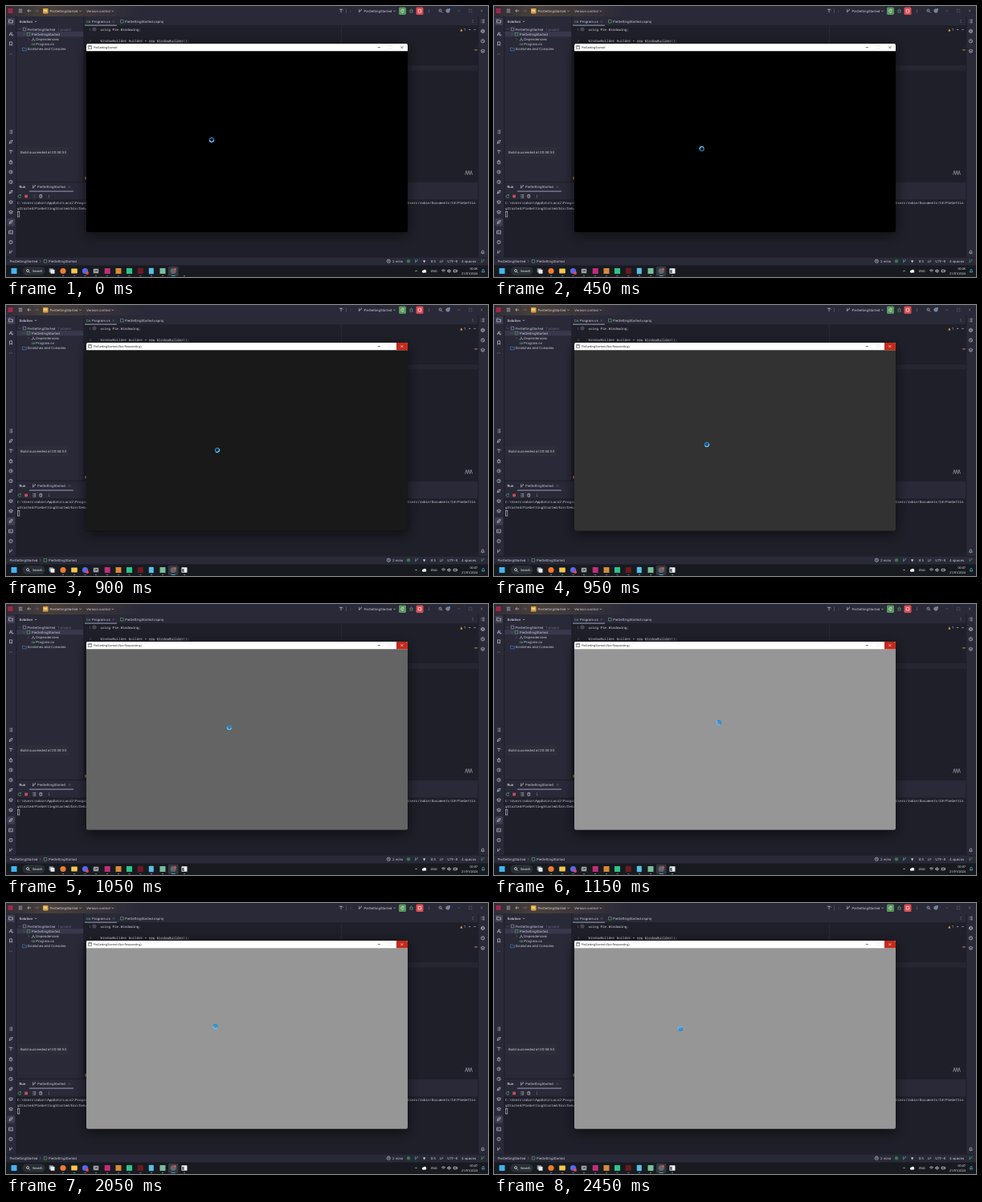
These frames come from a looping animation (600 by 338 pixels, 2.5 s). An HTML page with a canvas:

```html
<!DOCTYPE html>
<html lang="en">
<head>
<meta charset="utf-8">
<title>PieGettingStarted</title>
<style>
  html, body { margin: 0; width: 100%; height: 100%; overflow: hidden; background: #292938; }
  canvas { display: block; width: 600px; height: 338px; }
</style>
</head>
<body>
<canvas id="stage" width="600" height="338"></canvas>
<script>
const g = document.getElementById('stage').getContext('2d');
const LOOP = 2500, STEP = 50;
const UI = 'Inter, sans-serif', MONO = '"Noto Sans Mono", monospace', SYS = '"Open Sans", sans-serif';
const FG = '#cfd1dd', DIM = '#6d6f7e', PANEL = '#292938', EDITOR = '#1f1f29', LINE = '#1b1b25', TAB = '#84869c';
const GREEN = '#5aa865', RED = '#c94f55', BLUE = '#4b9fe8', AMBER = '#d9a441';

function rect(x, y, w, h, color, r = 0) {
  g.fillStyle = color;
  g.beginPath();
  g.roundRect(x, y, w, h, r);
  g.fill();
}

function disc(x, y, r, color) {
  g.fillStyle = color;
  g.beginPath();
  g.arc(x, y, r, 0, 7);
  g.fill();
}

function text(s, x, y, color = FG, { size = 4.2, font = UI, weight = 400, align = 'left' } = {}) {
  g.font = `${weight} ${size}px ${font}`;
  g.textRendering = 'geometricPrecision';
  g.textAlign = align;
  g.textBaseline = 'alphabetic';
  g.fillStyle = color;
  g.fillText(s, x, y + size * 0.36);
}

// Line icons, drawn around their centre
const ICONS = {
  menu: 'M-2.3-1.8h4.6M-2.3 0h4.6M-2.3 1.8h4.6',
  back: 'M2.2 0h-4.4l1.8-1.8m-1.8 1.8l1.8 1.8',
  next: 'M-2.2 0h4.4l-1.8-1.8m1.8 1.8l-1.8 1.8',
  down: 'M-1.2-.6l1.2 1.2l1.2-1.2',
  up: 'M-1.2.6l1.2-1.2l1.2 1.2',
  right: 'M-.6-1.2l1.2 1.2l-1.2 1.2',
  folder: 'M-2.4-1.8h1.8l.8.8h2.2v3h-4.8z',
  box: 'M-1.8-1.8h3.6v3.6h-3.6z',
  bookmark: 'M-1.5-2.2h3v4.4l-1.5-1.2l-1.5 1.2z',
  people: 'M-1.6 2.2v-2h2.6v2M.3-2a1 1 0 1 0 .1 0M1.6 2h1v-1.4',
  list: 'M-2-1.8h.6M-.6-1.8h2.8M-2 0h.6M-.6 0h2.8M-2 1.8h.6M-.6 1.8h2.8',
  hammer: 'M-2.2-1.8h3.8l.8 1.2M0-1.8v4',
  rocket: 'M-2 2l1-3l3-1l-1 3l-3 1M-1 0l1 1',
  bug: 'M-1.2-1h2.4v2.4a1.2 1.2 0 0 1-2.4 0zM-2.3-.4l1 .4M2.3-.4l-1 .4M-2.3 2l1-.6M2.3 2l-1-.6M-.8-2h1.6',
  clock: 'M2.1 0a2.1 2.1 0 1 1-4.2 0a2.1 2.1 0 1 1 4.2 0M0-1.2v1.3l1 .6',
  layers: 'M0-2l2.4 1.3L0 .6l-2.4-1.3zM-2.4.8L0 2.1L2.4.8',
  term: 'M-2.4-1.8h4.8v3.8h-4.8zM-1.4-.7l.9.8l-.9.8M.2 1h1',
  alert: 'M2.1 0a2.1 2.1 0 1 1-4.2 0a2.1 2.1 0 1 1 4.2 0M0-1.1v1.2M0 .8v.4',
  branch: 'M-1.3-2v4M-1.3 1.2c0-1.4 2.6-.4 2.6-2.6M.7-1.8h1.2',
  search: 'M1-.4a1.5 1.5 0 1 1-3 0a1.5 1.5 0 1 1 3 0M.6.8l1.5 1.5',
  gear: 'M1.1 0a1.1 1.1 0 1 1-2.2 0a1.1 1.1 0 1 1 2.2 0M0-2.2L2-1.1V1.1L0 2.2L-2 1.1V-1.1z',
  bell: 'M-1.9 1.2h3.8l-.7-1v-1a1.2 1.2 0 0 0-2.4 0v1zM-.4 2h.8',
  close: 'M-1.3-1.3l2.6 2.6m0-2.6l-2.6 2.6',
  min: 'M-1.5 0h3',
  dots: 'M-1.9 0h.6M-.3 0h.6M1.3 0h.6',
  vdots: 'M0-1.6v.6M0-.3v.6M0 1v.6',
  reload: 'M1.4-1a1.8 1.8 0 1 0 .3 1.6M1.5-2v1.2h-1.2',
  trash: 'M-1.8-1.4h3.6M-1.3-1.4v3.2h2.6v-3.2M-.5-2h1',
  wave: 'M-4.5 2.5l1.5-5l1.5 5l1.5-5l1.5 5l1.5-5l1.5 5',
  tree: 'M0-1.8v1.6M-1.7 1.6L0-.2L1.7 1.6M-2.1 1.6h.9M1.2 1.6h.9',
  wifi: 'M-2.3-.6a3.2 3.2 0 0 1 4.6 0M-1.3.5a1.9 1.9 0 0 1 2.6 0M0 1.4v.2',
  sound: 'M-2-.7h1l1.3-1.2v3.8L-1 .7h-1zM1.3-1a1.6 1.6 0 0 1 0 2',
  battery: 'M-2.3-1.2h4v2.4h-4zM2.2-.4v.8'
};

function icon(name, x, y, color = FG, width = 0.65) {
  g.save();
  g.translate(x, y);
  g.strokeStyle = color;
  g.lineWidth = width;
  g.stroke(new Path2D(ICONS[name]));
  g.restore();
}

function topBar() {
  rect(0, 0, 600, 13, PANEL);
  const glow = g.createLinearGradient(0, 0, 170, 0);
  glow.addColorStop(0, '#d9a44108');
  glow.addColorStop(0.3, '#d9a44130');
  glow.addColorStop(1, '#d9a44100');
  rect(0, 0, 170, 13, glow);
  rect(2.5, 3, 6, 6, '#a52745');
  icon('menu', 18, 6);
  icon('back', 29, 6);
  icon('next', 38, 6, DIM);
  rect(46, 3, 6.5, 6.5, AMBER, 1);
  text('PG', 49.2, 6.2, '#fff', { size: 3, weight: 700, align: 'center' });
  text('PieGettingStarted', 54.5, 6.3);
  icon('down', 92.5, 6.3);
  text('Version control', 100, 6.3);
  icon('down', 132.8, 6.3);
  icon('hammer', 417, 6);
  rect(423.2, 3.5, 0.5, 5.5, DIM);
  icon('vdots', 429, 6.3, DIM);
  icon('branch', 441, 6);
  text('PieGettingStarted', 445.5, 6.3);
  icon('down', 483.5, 6.3);
  rect(489, 1.5, 9, 9.5, '#57965c', 1.5);
  icon('reload', 493.5, 6.2, '#fff');
  icon('bug', 504.5, 6, GREEN);
  rect(510.5, 1.5, 9, 9.5, '#d94c52', 1.5);
  icon('box', 515, 6.2, '#fff');
  icon('vdots', 526.5, 6.2);
  icon('search', 541, 6);
  icon('gear', 550, 6);
  disc(552, 4, 1, BLUE);
  icon('min', 564, 6, DIM);
  icon('box', 578, 6, DIM, 0.4);
  icon('close', 592, 6, DIM);
}

function sideStrips() {
  rect(1.5, 14.5, 9.5, 9.5, '#3d3e50', 1.5);
  rect(1.5, 265, 9.5, 9.5, '#3d3e50', 1.5);
  [['folder', 19], ['people', 35], ['bookmark', 47], ['dots', 60]]
    .forEach(([name, y]) => icon(name, 6, y));
  ['list', 'rocket', 'hammer', 'bug', 'clock', 'clock', 'rocket', 'layers', 'layers', 'rocket', 'term', 'alert', 'branch']
    .forEach((name, i) => icon(name, 6, 157 + i * 12.5));
  ['list', 'gear', 'clock', 'layers'].forEach((name, i) => icon(name, 593.5, 19 + i * 12.4));
  icon('bell', 593.5, 307);
  rect(12.5, 13, 0.7, 300, LINE);
  rect(587.5, 13, 0.7, 300, LINE);
}

function solution() {
  text('Solution', 16.5, 19.3, FG, { weight: 600 });
  icon('down', 37, 19.3);
  rect(13.2, 32, 83.3, 6.3, '#38384c');
  icon('down', 17, 29, DIM);
  icon('box', 23, 29, '#9aa0c0');
  text('PieGettingStarted', 26.5, 29.2);
  text('1 project', 64.5, 29.2, DIM);
  icon('down', 22.5, 35.2, DIM);
  icon('box', 28, 35.2, GREEN);
  text('PieGettingStarted', 32, 35.3);
  icon('right', 28, 41.5, DIM);
  icon('tree', 34, 41.5);
  text('Dependencies', 37.3, 41.6);
  text('C#', 31.5, 47.8, GREEN, { size: 3.5, weight: 700 });
  text('Program.cs', 37.3, 47.8);
  icon('folder', 23, 53.8, BLUE, 0.5);
  text('Scratches and Consoles', 26.5, 53.9);
  rect(13.5, 176, 65, 12.8, '#2d2d39', 1.5);
  text('Build succeeded at 00:06:53', 18, 182.4);
}

function editor() {
  rect(97, 13, 490.5, 206, EDITOR);
  rect(97, 13, 490.5, 11.8, PANEL);
  rect(97, 24.6, 490.5, 0.5, LINE);
  rect(96.5, 13, 0.7, 206, LINE);
  rect(98, 23.5, 40, 1.2, TAB);
  text('C#', 100, 19.3, GREEN, { size: 3.7, weight: 700 });
  text('Program.cs', 107, 19.3);
  icon('close', 133.8, 19.3, DIM, 0.5);
  icon('box', 144.3, 19.2, GREEN);
  text('PieGettingStarted.csproj', 148, 19.3);
  icon('vdots', 581, 19);

  const code = { font: MONO };
  text('1', 103.5, 29.5, DIM, code);
  text('3', 103.5, 43.3, DIM, code);
  icon('gear', 110, 29, DIM);
  text('using Pie.Windowing;', 117.5, 29.5, FG, code);
  text('WindowBuilder builder = new WindowBuilder();', 117.5, 43.3, FG, code);
  rect(178, 45.2, 7.5, 0.4, DIM);
  rect(188, 45.2, 32, 0.4, DIM);
  rect(417, 25, 0.5, 194, '#343442');
  rect(500, 74, 87.5, 6.5, '#262632');
  text('▲', 565.2, 29.5, AMBER, { font: '"DejaVu Sans", sans-serif' });
  text('1', 570, 29.7, FG);
  icon('up', 577, 29.5);
  icon('down', 583.5, 29.5);
  rect(583, 54.5, 4, 0.8, AMBER);
  icon('wave', 576, 208, '#a9abb8');
  rect(98.5, 213, 1, 3.5, AMBER);
}

function runPanel(running) {
  rect(13.2, 219, 574.3, 94, PANEL);
  rect(13.2, 219, 574.3, 0.7, LINE);
  text('Run', 16.5, 225.5, FG, { weight: 600 });
  rect(29, 230.6, 55, 1.2, TAB);
  icon('branch', 35, 225.5);
  text('PieGettingStarted', 39, 225.5);
  icon('close', 79, 225.5, DIM, 0.5);
  icon('reload', 17, 237.2, GREEN);
  rect(23.2, 235.4, 3.8, 3.8, RED, 0.6);
  icon('list', 35, 237.2, running ? FG : '#4b4c59');
  icon('trash', 43.3, 237.2);
  icon('vdots', 53.5, 237.2);
  rect(13.2, 241.5, 574.3, 71.5, EDITOR);
  const mono = { size: 4.15, font: MONO };
  text('C:\\Users\\robin\\AppData\\Local\\Programs', 14, 246, FG, mono);
  text('Users/robin/Documents/C#/PieGettin', 584.5, 246, FG, { ...mono, align: 'right' });
  text('gStarted/PieGettingStarted/bin/Debug', 14, 253, FG, mono);
  g.strokeStyle = FG;
  g.lineWidth = 0.6;
  g.strokeRect(14.3, 256.5, 2.5, 6.5);
}

function statusBar() {
  rect(0, 313, 600, 10.5, PANEL);
  rect(0, 313, 600, 0.6, LINE);
  text('PieGettingStarted', 4.5, 318.3);
  icon('right', 42.7, 318.3, DIM);
  icon('box', 49, 318.3, GREEN);
  text('PieGettingStarted', 53, 318.3);
  icon('clock', 476.3, 318.2);
  text('2 mins', 481, 318.3);
  disc(501, 318.2, 2.2, '#347a45');
  icon('branch', 511, 318.2, '#57b9c9');
  text('▼', 519, 318.3, FG, { font: '"DejaVu Sans", sans-serif' });
  text('8:5', 528.7, 318.3);
  text('LF', 539.8, 318.3);
  text('UTF-8', 549.3, 318.3);
  text('4 spaces', 567, 318.3);
  icon('branch', 593.5, 318.2, GREEN);
}

function taskbar(t, running) {
  rect(0, 323.5, 600, 14.5, '#171b20');
  rect(6.5, 327, 7, 7, '#42b4f2');
  rect(20.5, 325.3, 28, 10.5, '#2a2f36', 5.2);
  icon('search', 27.5, 330.5, '#fff');
  text('Search', 33, 330.7, '#fff', { size: 4, font: SYS });
  rect(53.7, 327.3, 5, 5, '#8d979e');
  rect(55.5, 328.8, 5, 5, '#e9edef');
  disc(71, 330.5, 3.6, '#f17b2c');
  rect(81.2, 327.5, 7.6, 6, '#f3c74f', 0.8);
  disc(98.5, 330.5, 3.6, '#5865f2');
  disc(101, 333, 2, '#e34a4a');
  rect(108.5, 327.2, 7, 6.5, '#4a5055', 0.8);
  icon('term', 112, 330.4, '#fff');
  rect(122.7, 327, 7, 7, '#c22d78');
  rect(136.5, 327, 7, 7, '#d88b35');
  rect(150, 327, 7, 7, '#2bc58b');
  rect(163.8, 327, 7, 7, '#6e1822');
  rect(177.8, 326.8, 6, 7.4, '#59bfe9', 0.8);
  rect(191.5, 327, 7, 7, '#79bd9c');
  rect(202, 324.7, 12.5, 12, '#33383e', 1.5);
  disc(208.2, 330.5, 3.6, '#60666c');
  disc(210.5, 328.3, 1.5, '#e34a4a');
  [71, 85, 98.5, 112, 126, 140, 153.5, 167.3, 181, 195].forEach(x => rect(x - 1, 336, 2, 0.7, '#8c979f'));
  rect(205.7, 336, 5, 0.8, '#56b6ee');
  rect(221, 336, 2, 0.7, '#8c979f');
  if (running) {
    rect(218.5, 327.2, 7, 6.5, '#f2f2f2', 0.5);
    rect(219.2, 329, 2.5, 4, '#53636e');
  }
  icon('up', 510.5, 330.5, '#fff');
  disc(519.5, 331, 1.6, '#fff');
  disc(521.3, 330.5, 1.8, '#fff');
  rect(518.3, 331, 5, 1.6, '#fff', 0.8);
  const sys = { size: 3.75, font: SYS };
  text('ENG', 529, 330.7, '#fff', sys);
  icon('wifi', 544.5, 330.5, '#fff');
  icon('sound', 551.7, 330.5, '#fff');
  icon('battery', 559.5, 330.5, '#fff');
  text(t < 900 ? '00:06' : '00:07', 587, 327.7, '#fff', { ...sys, align: 'right' });
  text('21/01/2024', 587, 333.4, '#fff', { ...sys, align: 'right' });
  icon('bell', 594, 330.5, '#62bdf0');
}

// The frozen window pales from black to grey
const paleness = t => Math.max(0, Math.min(1, (t - 850) / 300));

function appWindow(t) {
  const frozen = t >= 850;
  const grey = 150 * paleness(t);
  g.save();
  g.shadowColor = '#0009';
  g.shadowBlur = 16;
  g.shadowOffsetY = 4;
  rect(100, 47, 400, 234.8, '#000', 2);
  g.restore();
  rect(100, 47, 400, 234.8, `rgb(${grey},${grey},${grey})`, 2);
  rect(100, 47, 400, 9.3, '#fff', [2, 2, 0, 0]);
  rect(102.3, 49.3, 4.5, 4.5, '#59616b');
  rect(102.9, 50.5, 3.3, 2.7, '#eef2f5');
  text('PieGettingStarted' + (frozen ? ' (Not Responding)' : ''), 109, 51.6, '#111', { size: 3.6, font: SYS });
  if (frozen) rect(486, 47, 14, 9.3, '#c42b1c', [0, 2, 0, 0]);
  icon('min', 464.3, 51.6, '#222');
  icon('box', 478.5, 51.6, '#ddd', 0.4);
  icon('close', 492.8, 51.6, frozen ? '#fff' : '#222', 0.6);
}

const PATH = [[0, 256, 167], [850, 261, 188], [950, 265, 174], [1050, 278, 154], [1150, 280, 148],
  [1650, 268, 152.5], [2200, 258, 154.5], [2450, 232, 156.7], [2500, 230, 157]];

function busyCursor(t) {
  const i = PATH.findIndex(p => p[0] > t);
  const [a, b] = [PATH[i - 1], PATH[i]];
  const k = (t - a[0]) / (b[0] - a[0]);
  g.save();
  g.translate(a[1] + (b[1] - a[1]) * k, a[2] + (b[2] - a[2]) * k);
  g.rotate(t / 1000 * 2 * Math.PI);
  g.globalAlpha = 0.7 * paleness(t);
  disc(0, 0, 2.4, '#2b8fdc');
  g.globalAlpha = 1;
  g.lineWidth = 1.2;
  for (const [color, end] of [['#2489d8', 2 * Math.PI], ['#6cc6f7', 3]]) {
    g.strokeStyle = color;
    g.beginPath();
    g.arc(0, 0, 2.6, 0, end);
    g.stroke();
  }
  g.restore();
}

function draw(now) {
  const t = Math.floor(now % LOOP / STEP) * STEP;
  const running = t >= 300;
  rect(0, 0, 600, 338, PANEL);
  topBar();
  solution();
  editor();
  runPanel(running);
  sideStrips();
  statusBar();
  taskbar(t, running);
  appWindow(t);
  busyCursor(t);
}

let start;
function tick(now) {
  start ??= now;
  draw(now - start);
  requestAnimationFrame(tick);
}
requestAnimationFrame(tick);
</script>
</body>
</html>
```
